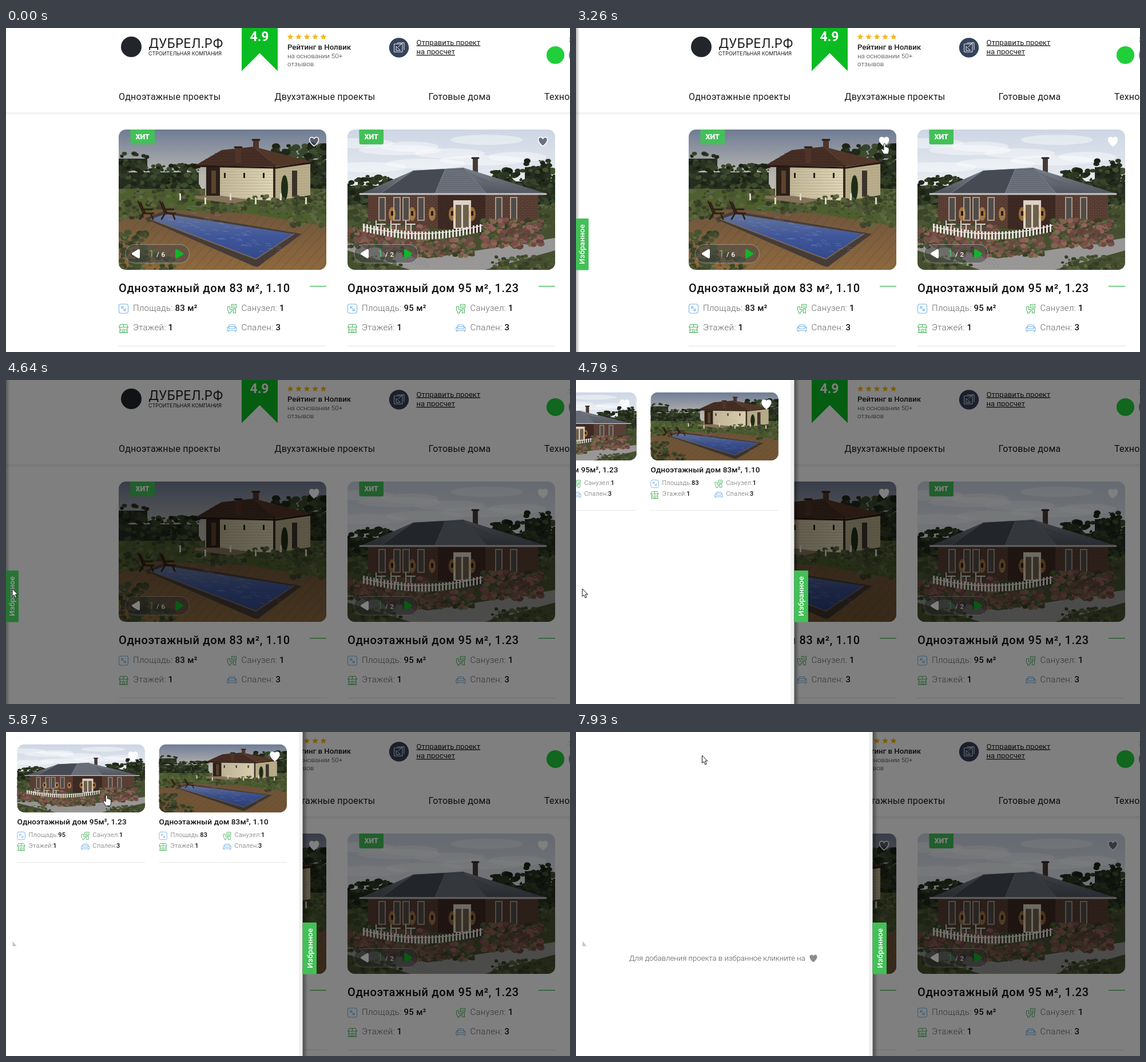
Write an HTML page that moves like this. It is 986 by 568 pixels and loops after 8000 ms.

```html
<!DOCTYPE html>
<html lang="ru">
<head>
<meta charset="utf-8">
<title>Избранные проекты</title>
<style>
html, body { margin: 0; width: 100%; height: 100%; overflow: hidden; background: #fff; }
svg { display: block; }
text { font-family: Roboto, "Noto Sans", sans-serif; white-space: pre; }
.logo { font-family: Inter, "Noto Sans", sans-serif; }
.line { fill: none; stroke-linecap: round; stroke-linejoin: round; }
</style>
</head>
<body>
<svg id="stage" width="986" height="568" viewBox="0 0 986 568"></svg>
<script>
const GREEN = '#43c058', BLUE = '#79b5ea', LEAF = '#55b866', INK = '#1b1b1b';
const LOOP = 8000;

// ---------- drawing helpers ----------
let seed = 7;
const rnd = (a = 0, b = 1) => a + (b - a) * (seed = seed * 16807 % 2147483647) / 2147483647;
const times = (n, fn) => Array.from({ length: n }, (_, i) => fn(i)).join('');
const text = (x, y, size, weight, fill, str, more = '') =>
  `<text x="${x}" y="${y}" font-size="${size}" font-weight="${weight}" fill="${fill}" ${more}>${str}</text>`;
const space = px => `letter-spacing="${px}"`;
const rect = (x, y, w, h, fill, more = '') =>
  `<rect x="${x}" y="${y}" width="${w}" height="${h}" fill="${fill}" ${more}/>`;
const disc = (x, y, rx, ry, fill) => `<ellipse cx="${x.toFixed(1)}" cy="${y.toFixed(1)}" rx="${rx.toFixed(1)}" ry="${ry.toFixed(1)}" fill="${fill}"/>`;
const poly = (points, fill) => `<polygon points="${points}" fill="${fill}"/>`;
const line = (d, stroke, width = 1) => `<path class="line" d="${d}" stroke="${stroke}" stroke-width="${width}"/>`;
const move = (x, y, body, more = '') => `<g transform="translate(${x} ${y})" ${more}>${body}</g>`;
const fade = (id, colors, dir = 'x2="0" y2="1"') => `<linearGradient id="${id}" ${dir}>` +
  colors.map((c, i) => `<stop offset="${i / (colors.length - 1)}" stop-color="${c}"/>`).join('') + '</linearGradient>';

// leaf clumps that fill a box; lit ones lie among shaded ones
const leaves = (x, y, w, h, hue, light) => times(Math.ceil(w * h / 38), () => {
  const r = rnd(1.5, 4 + h * .06);
  return disc(x + rnd() * w, y + rnd() * h, r, r * .75, `hsl(${hue + rnd(-12, 12)} 24% ${light + rnd(-8, 8)}%)`);
});
const trees = (x, y, w, h) => rect(x, y + h * .3, w, h * .7, '#252d20') + leaves(x, y, w, h, 88, 17);
const bushes = (x, y, w, h) => leaves(x, y, w, h, 78, 26);
const flowers = (x, y, w, h) => bushes(x, y, w, h) + leaves(x, y, w, h, 15, 38);

// both scenes share the size of the card photo
const W = 363, H = 246;

function poolHouse() {
  let s = rect(0, 0, W, H, 'url(#dusk)') + trees(0, 62, 140, 44) + trees(0, 42, 50, 30) + trees(270, 28, W - 270, 85);
  s += rect(0, 104, W, 70, '#4d5f2b') + bushes(0, 106, W, 34);
  // walls, openings, roof
  s += poly('151,62 272,64 272,125 151,117', 'url(#cream)') + poly('272,64 335,58 335,115 272,125', '#b9ad8b');
  s += times(11, i => line(`M178 ${69 + i * 5}H272L335 ${66 + i * 4.6}`, '#a79b7a', .6));
  s += rect(153, 66, 24, 50, '#2a2019') + rect(162, 72, 8, 40, '#5d432d') + rect(303, 72, 9, 46, '#3a332a');
  s += times(3, i => rect(184 + i * 34, 76, 3, 9, '#241d1a')) + rect(270, 64, 4, 60, '#382b22');
  s += disc(290, 102, 6, 22, '#1f2d17');
  s += poly('132,64 180,36 236,30 276,65', '#462e25') + poly('236,30 340,57 276,65', '#523729');
  s += times(5, i => line(`M${168 - i * 8} ${42 + i * 5}H${246 + i * 7}`, '#3b261f', .7));
  s += line('M132 64L276 67L340 58', '#241712', 3);
  s += rect(204, 31, 10, 28, '#4f342a') + rect(235, 18, 10, 15, '#4f342a') + line('M203 31H215M234 18H246', '#2a1b17', 3);
  s += poly('133,116 180,116 228,123 200,130 134,121', '#85725a') + bushes(225, 116, 138, 14);
  // deck, pool, planting
  s += poly('0,160 66,140 220,146 363,170 363,246 0,246', 'url(#deck)');
  s += times(24, i => line(`M${i * 17 - 40} 246L${i * 17 + 45} 150`, 'rgba(60,38,18,.35)', .8));
  s += bushes(300, 136, 63, 34) + bushes(0, 140, 66, 20);
  s += poly('45,156 79,143 320,183 243,241 235,239', '#463c37') + poly('56,157 82,148 306,183 240,227', 'url(#water)');
  s += line('M56 157L240 227L306 183', '#75675b', 2);
  s += times(50, () => {
    const u = rnd(), v = rnd();
    return line(`M${70 + u * 165 + v * 55} ${157 + u * 57 - v * 30 * (1 - u)}q5 -2 9 1`, 'rgba(140,165,215,.45)', .8);
  });
  s += bushes(0, 178, 48, 68) + bushes(48, 218, 50, 28) + bushes(143, 130, 80, 16) + bushes(240, 132, 80, 16);
  s += times(6, i => rect(106 + i * 44, 112 + i % 2 * 7, 3, 12, '#dcd8c8'));
  const chair = line('M0 0L9 21H27M4 2L12 20M9 21L3 31M22 21L26 31M6 14H24', '#321e15', 2.8);
  return s + move(34, 126, chair) + move(72, 126, chair) + rect(0, 0, W, H, 'url(#shade)');
}

function brickHouse() {
  let s = rect(0, 0, W, H, 'url(#cloudy)');
  s += times(9, i => disc(rnd(0, W), 18 + i * 6, rnd(40, 80), 9, 'rgba(255,255,255,.4)'));
  s += trees(0, 82, 80, 55) + trees(252, 70, W - 252, 70) + trees(310, 54, 45, 40);
  s += rect(0, 132, W, H - 132, '#454f30') + bushes(0, 132, 60, 60) + bushes(320, 132, 43, 40);
  // chimney, walls, openings
  s += rect(219, 50, 9, 32, '#4a3a36') + line('M218 50H229', '#2b2524', 3);
  s += poly('36,110 333,110 333,158 241,182 36,160', 'url(#brick)') + poly('158,110 241,110 241,182 158,174', 'rgba(20,12,10,.4)');
  s += times(6, i => {
    const x = 54 + i * 26 + (i > 3 ? 100 : 0) - (i > 1 && i < 4 ? 10 : 0);
    return rect(x, 118, 13, 42, '#a8988a') + rect(x + 2, 120, 9, 38, '#4f4c49');
  });
  s += rect(185, 124, 31, 50, '#ddd3c4') + times(2, i => rect(189 + i * 13, 132, 10, 40, '#6d604f'));
  s += times(5, i => disc(78 + i * 35, 148, 6, 12, 'rgba(235,175,90,.5)') + rect(76 + i * 35, 143, 4, 8, '#241c19'));
  // roof
  s += poly('22,113 115,72 203,67 347,112', 'url(#slate)') + poly('115,72 171,69 153,112 58,112', '#454a53') + poly('171,69 203,67 243,112 153,112', '#646a74');
  s += times(11, i => line(`M${169 - i * 1.5} ${73 + i * 3.6}H${206 + i * 3.4}`, '#7d838c', .6) + line(`M${206 + i * 3} ${70 + i * 2}L${248 + i * 9} 112`, '#5e646d', .6));
  s += line('M115 72L58 112M171 69L153 112M203 67L243 112', '#7c828c') + line('M22 113H347', '#cbc8c4', 3);
  // paths, fence, planting
  s += poly('0,196 140,226 363,190 363,212 240,246 110,246 0,212', '#989796');
  s += times(20, i => line(`M${i * 7} ${199 + i * 1.5}l9 14`, '#7d7d7d', .6));
  s += flowers(0, 170, 140, 36) + flowers(60, 190, 165, 32) + flowers(235, 158, 105, 48);
  s += times(35, i => rect(27 + i * 6, 165 + 14 * Math.sin(i / 11), 3, 14, '#e6e3de'));
  s += line('M27 170Q130 196 236 168', '#e6e3de', 1.5);
  s += times(3, i => line(`M${52 + i * 26} 166h14M${59 + i * 26} 166v12M${50 + i * 26} 160v16`, '#d8d4ce', 2));
  return s + bushes(250, 222, 113, 24) + bushes(0, 222, 95, 24);
}

// ---------- small parts ----------
const HEART = 'M0 8C-5 4 -8 -.5 -8 -3.5C-8 -6 -6.2 -7.8 -4 -7.8C-2.2 -7.8 -.8 -6.8 0 -5.2C.8 -6.8 2.2 -7.8 4 -7.8C6.2 -7.8 8 -6 8 -3.5C8 -.5 5 4 0 8Z';
const heart = (id, x, y) =>
  `<path id="${id}" d="${HEART}" transform="translate(${x} ${y})" fill="#fff" stroke="#fff" stroke-width="1.5"/>`;

const SPECS = [
  ['Площадь', BLUE, 'M4 .5H13Q16.5 .5 16.5 4V13Q16.5 16.5 13 16.5H4Q.5 16.5 .5 13V4Q.5 .5 4 .5ZM5 5L12 12M5 8.5V5H8.5M12 8.5V12H8.5'],
  ['Санузел', LEAF, 'M8 1H16V7H8ZM10 4H14M1 5H5V10H9Q9 14 6 14V16.5H3V14Q1 13 1 10ZM11 9H15V16H11Z'],
  ['Этажей', LEAF, 'M3 2H14L16.5 7H.5ZM2 7V16H15V7M1 16.5H16M7 16V10.5H10V16M4 10V13M13 10V13M8.5 2V7'],
  ['Спален', BLUE, 'M3 8V4Q3 3 5 3H12Q14 3 14 4V8M.5 8Q.5 6.5 2 7L3.5 10H13.5L15 7Q16.5 6.5 16.5 8V13H.5ZM2 13V15M15 13V15M4 6H13']
];

// two columns by two rows of labelled values
const specs = (x, y, size, dx, dy, gap, values, colon) => SPECS.map(([label, color, d], i) => {
  const px = x + i % 2 * dx, py = y + (i >> 1) * dy;
  return move(px, py - size * .83, `<g transform="scale(${size > 12 ? 1 : .84})">${line(d, color, 1.1)}</g>`) +
    text(px + gap, py, size, 300, '#666', `${label}${colon}<tspan font-weight="500" fill="#111">${values[i]}</tspan>`, space(.28));
}).join('');

function card(n, x, area, model, pages) {
  let s = move(197, 178, `<use href="#house${n}"/>`, 'clip-path="url(#clipMain)"');
  s += rect(217.5, 178, 42.5, 26, GREEN, 'rx="3"') + rect(217.5, 178, 42.5, 8, GREEN);
  s += text(238.7, 195.3, 12.6, 900, '#fff', 'ХИТ', 'text-anchor="middle"') + heart('main' + n, 538.6, 199.2);
  s += rect(208.5, 379.5, 112, 32.5, 'rgba(70,70,70,.5)', 'rx="16.2" stroke="rgba(255,255,255,.35)"');
  const play = color => `<path d="M-5 -6V6L5 0Z" fill="${color}" stroke="${color}" stroke-width="4" stroke-linejoin="round"/>`;
  s += move(227, 395.7, `<g transform="scale(-1 1)">${play('#fff')}</g>`) + move(303, 395.7, play('#10b52a'));
  s += text(249.5, 401, 17, 400, '#4cc760', '1') + text(263, 401, 11.5, 500, '#fff', '/ ' + pages, space(.5));
  s += text(197, 463, 20, 500, '#111', `Одноэтажный дом ${area} м², ${model}`, space(.62)) + rect(531, 452, 29, 1.4, GREEN);
  return move(x, 0, s + specs(197, 496, 15, 189.5, 34, 25, [area + ' м²', 1, 1, 3], ': ') + rect(197, 557, W, 1, '#e2e2e2'));
}

function miniCard(n, x, area, model) {
  let s = move(19.5, 21.5, `<use href="#house${n}" transform="scale(.6157 .4858)"/>`, 'clip-path="url(#clipMini)"');
  s += heart('mini' + n, 222, 42.7) + text(19.5, 162, 13.6, 500, '#111', `Одноэтажный дом ${area}м², ${model}`, space(.09));
  return move(x, 0, s + specs(19.5, 184, 11, 112, 19, 20, [area, 1, 1, 3], ':') + rect(19.5, 228, 223.5, 1, '#e8e8e8'), `id="card${n}"`);
}

const star = x => poly(Array.from({ length: 10 }, (_, i) => {
  const a = i * Math.PI / 5, r = i % 2 ? 2.7 : 5.6;
  return [x + r * Math.sin(a), 15.6 - r * Math.cos(a)].map(v => v.toFixed(1));
}).join(' '), '#f7b71d');

function header() {
  let s = rect(0, 148, 986, 6, 'url(#headShade)');
  s += disc(219, 33, 18, 18, '#22252a') + text(249, 35, 22.4, 400, INK, 'ДУБРЕЛ.РФ', 'class="logo"');
  s += text(249, 47.5, 8.9, 400, INK, 'СТРОИТЕЛЬНАЯ КОМПАНИЯ', 'class="logo"');
  s += poly('412,0 475,0 475,75.5 443.5,44 412,75.5', '#0abb22') + text(443, 23, 23, 700, '#fff', '4.9', 'text-anchor="middle"');
  s += times(5, i => star(497 + i * 14.5)) + text(492, 38, 13.2, 500, INK, 'Рейтинг в Нолвик');
  s += text(492, 52.5, 11.7, 300, '#333', 'на основании 50+') + text(492, 66.5, 11.7, 300, '#333', 'отзывов');
  s += disc(687, 34.5, 17.2, 17.2, '#35435a');
  s += line('M679 28H693V42H679ZM682 39V32L689 39ZM684 26H696V38M686 33L694 25', '#e8edf4');
  s += ['Отправить проект', 'на просчет'].map((row, i) =>
    text(717.5, 29.5 + i * 16.5, 13.1, 400, INK, row, 'text-decoration="underline"')).join('');
  s += disc(960.5, 47.5, 15.6, 15.6, '#20cf3a') + disc(999.5, 47.5, 15.6, 15.6, '#4b9be0') + text(984.5, 25, 12, 400, '#444', 'З');
  const nav = { 197: 'Одноэтажные проекты', 469.5: 'Двухэтажные проекты', 738.5: 'Готовые дома', 941: 'Технологии' };
  return s + Object.entries(nav).map(([x, label]) => text(x, 126, 16, 400, INK, label, space(.22))).join('');
}

function panel() {
  let s = rect(518.5, 0, 9, 568, 'url(#sideShade)', 'id="shade"') + rect(0, 0, 512.5, 568, '#fff') + rect(512, 0, 6.5, 568, '#f0f0f0');
  s += miniCard(2, 0, 95, '1.23') + miniCard(1, 248, 83, '1.10');
  s += '<g id="empty">' + text(93, 401, 13.2, 300, '#555', 'Для добавления проекта в избранное кликните на') +
    `<path d="${HEART}" transform="translate(415 397) scale(.82)" fill="#8d8d8d"/></g>`;
  const tab = fill => rect(518.5, 334, 24.5, 90.5, fill);
  s += tab(GREEN) + text(0, 0, 13.6, 500, '#fff', 'Избранное', 'text-anchor="middle" transform="translate(535.5 379) rotate(-90)"');
  return `<g id="panel">${s}<g id="tabDim">${tab('rgba(0,0,0,.4)')}</g></g>`;
}

const clip = (id, w, h) => `<clipPath id="${id}">${rect(0, 0, w, h, '#000', 'rx="12.5"')}</clipPath>`;
document.getElementById('stage').innerHTML = '<defs>' +
  fade('dusk', ['#6f7c95', '#b9b6b0', '#c8c3b6', '#c8c3b6']) + fade('cloudy', ['#cdd6e4', '#f0f2f5', '#f6f4f1']) +
  fade('water', ['#66759a', '#3f569a', '#34498a']) + fade('deck', ['#6f553c', '#8d693f']) + fade('cream', ['#b9ae8f', '#e0d7b8'], '') +
  fade('slate', ['#7d838d', '#4e535c']) + fade('shade', ['#0000', '#0000', '#0003']) +
  fade('headShade', ['#0001', '#0000']) + fade('sideShade', ['#0006', '#0000'], '') +
  '<pattern id="brick" width="8" height="6" patternUnits="userSpaceOnUse">' + rect(0, 0, 8, 6, '#634639') +
  line('M0 .5H8M0 3.5H8M2 0V3M6 3V6', '#463029', .9) + '</pattern>' + clip('clipMain', W, H) + clip('clipMini', 223.5, 119.5) +
  `<g id="house1">${poolHouse()}</g><g id="house2">${brickHouse()}</g></defs>` +
  header() + card(1, 0, 83, '1.10', 6) + card(2, 400, 95, '1.23', 2) +
  rect(0, 0, 986, 568, 'rgba(0,0,0,.5)', 'id="veil"') + panel() + '<path id="speck" d="M11.5 366.5V375.5H18.5Z" fill="#c4c4c4"/>' +
  '<g id="cursor" fill="#fff" stroke="#111" stroke-linejoin="round">' +
  '<path id="arrow" d="M0 0V13.5L3 10.8L5.3 16L7.6 15L5.3 9.9H9.6Z"/>' +
  '<path id="hand" d="M-1.6 1.5Q0 -.7 1.6 1.5V6.6Q3.2 5.6 4 7.2Q5.6 6.4 6.2 8.2Q7.7 8 7.7 10V13.5Q7.7 16 6 19H-1.6Q-3 16 -5.4 12.6Q-6.4 10.3 -5 9.8Q-3.6 9.5 -1.6 12Z"/></g>';

// ---------- motion ----------
const LIKE_RIGHT = 1660, LIKE_LEFT = 3110, OPEN = 4640, DROP_FIRST = 6650, DROP_LAST = 7930, CLICK = 140;
const HOME = { x: 950, y: 541 };
const MOVES = [
  { from: 570, to: 1380, x: 941, y: 198 },
  { from: 1940, to: 2610, x: 539.5, y: 202 },
  { from: 3390, to: 4260, x: 11, y: 366 },
  { from: 5360, to: 6310, x: 220.5, y: 41 }
];
const easeOut = p => 1 - (1 - Math.min(1, Math.max(0, p))) ** 2;

const pointer = t => MOVES.reduce((at, m) => {
  const k = easeOut((t - m.from) / (m.to - m.from));
  return { x: at.x + (m.x - at.x) * k, y: at.y + (m.y - at.y) * k };
}, HOME);

const inside = (p, x, y, w, h) => p.x > x && p.x < x + w && p.y > y && p.y < y + h;
const overLink = (t, p) => t >= OPEN
  ? t < DROP_LAST && inside(p, 19, 21, 224, 144)
  : inside(p, 197, 178, W, H) || inside(p, 597, 178, W, H) || t >= LIKE_RIGHT && inside(p, 0, 334, 22, 90);

const $ = id => document.getElementById(id);
const show = (id, on) => $(id).setAttribute('display', on ? 'inline' : 'none');
const like = (id, on) => $(id).setAttribute('fill', on ? '#fff' : 'rgba(72,76,92,.75)');
const place = (id, x, y = 0) => $(id).setAttribute('transform', `translate(${x.toFixed(1)} ${y.toFixed(1)})`);

function draw(t) {
  like('main2', t >= LIKE_RIGHT && t < DROP_FIRST);
  like('main1', t >= LIKE_LEFT && t < DROP_LAST);
  like('mini2', t < DROP_FIRST - CLICK);
  like('mini1', t < DROP_LAST - CLICK);

  // the first visible step of the slide is already well under way
  const sliding = t >= OPEN + 150;
  show('veil', t >= OPEN);
  show('panel', t >= LIKE_RIGHT);
  show('tabDim', t >= OPEN && !sliding);
  show('shade', sliding);
  place('panel', sliding ? 521 * (easeOut((t - OPEN) / 310) - 1) : -521);

  show('card2', t < DROP_FIRST);
  show('card1', t < DROP_LAST);
  place('card1', t < DROP_FIRST ? 248 : 0);
  show('empty', t >= DROP_LAST);

  const p = pointer(t), hand = overLink(t, p);
  show('speck', t > MOVES[3].from + 70);
  show('cursor', t >= MOVES[0].from);
  show('hand', hand);
  show('arrow', !hand);
  place('cursor', p.x, p.y);
}

const begin = performance.now();
function loop() {
  draw((performance.now() - begin) % LOOP);
  requestAnimationFrame(loop);
}
loop();
</script>
</body>
</html>
```
